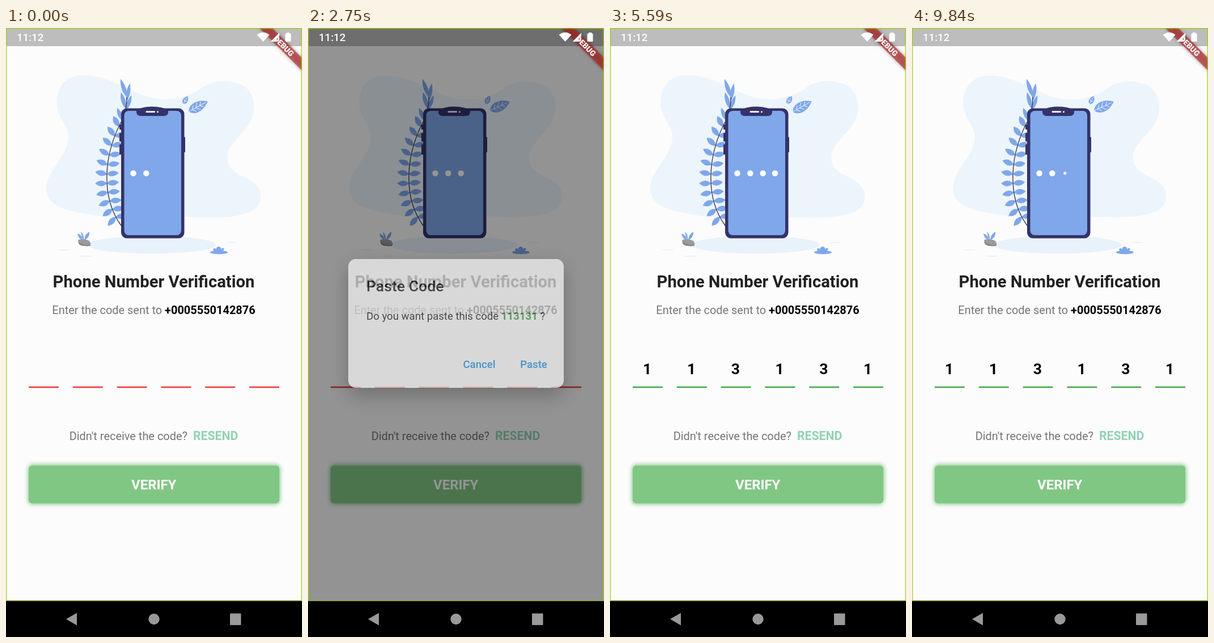
Write an HTML page that moves like this. It is 522x1073 px and loops after 9890 ms.

```html
<!DOCTYPE html>
<html lang="en">
<head>
<meta charset="utf-8">
<title>Phone Number Verification</title>
<style>
  html, body { margin: 0; width: 100%; height: 100%; overflow: hidden; background: #fcfcfc; }
  svg { display: block; width: 522px; height: 1073px; font-family: Roboto, sans-serif; }
  .bold { font-weight: 700; }
  .medium { font-weight: 500; }
  .mid { text-anchor: middle; }
  .button { fill: #81c784; filter: drop-shadow(1px -2px 3px #a5d6a7) drop-shadow(-1px 2px 3px #a5d6a7); }
  .card { fill: #fdfdfd; filter: drop-shadow(0 14px 17px rgba(0, 0, 0, .36)); }
  .ribbon { fill: #b71c1c; fill-opacity: .63; filter: drop-shadow(0 0 3px rgba(0, 0, 0, .5)); }
</style>
</head>
<body>
<svg viewBox="0 0 522 1073">
  <rect width="522" height="1073" fill="#fcfcfc"/>

  <g id="scene">
    <path id="blob" fill="#edf5fc" d="M127 81C175 77 212 109 252 120C288 128 323 121 345 105
      C365 89 391 88 414 96C433 103 442 120 441 140C440 181 393 196 393 230C394 268 453 259 453 299
      C453 324 428 331 398 335C354 340 310 333 261 335C209 338 168 337 127 328C88 321 67 308 67 284
      C67 252 106 228 107 191C107 169 87 160 86 132C85 102 102 83 127 81Z"/>
    <g fill="#e8f2fb">
      <ellipse cx="257" cy="382" rx="113" ry="15.5"/>
      <ellipse cx="102" cy="391" rx="11" ry="1"/>
      <ellipse cx="141" cy="402" rx="11" ry="1"/>
      <ellipse cx="398" cy="378" rx="10" ry="1"/>
    </g>
    <g id="plant" fill="#7fa7ea"></g>
    <path d="M203 348C168 300 170 225 206 160Q213 143 213 122" fill="none" stroke="#2c2b45" stroke-width="1.3"/>

    <g fill="#34326a">
      <rect x="203" y="141.500" width="111.500" height="229" rx="10"/>
      <path d="M236 142Q245 138.500 258 138.500T280 142Z"/>
      <rect x="200" y="170" width="4" height="9" rx="1"/>
      <rect x="200" y="185" width="4" height="15" rx="1"/>
      <rect x="200" y="205" width="4" height="18" rx="1"/>
      <rect x="312" y="192" width="4" height="27" rx="1"/>
    </g>
    <rect x="208.500" y="146" width="100.500" height="219" rx="8" fill="#7fa7ea"/>
    <path d="M230 145H286V148Q286 155 278 155H238Q230 155 230 148Z" fill="#34326a"/>
    <rect x="246.500" y="146.300" width="16.500" height="2.700" rx="1.300" fill="#fff"/>
    <circle cx="267.500" cy="147.700" r="1.500" fill="#fff"/>
    <g id="dots" fill="#fff"></g>

    <g id="bigLeaf">
      <path d="M-19 0C-13 -12 5 -12 19 0C5 12 -13 12 -19 0Z" fill="#7fa7ea"/>
      <path d="M-19 0H15M-12 0L-7 -6M-12 0L-7 6M-5 0L1 -7M-5 0L1 7M3 0L8 -5M3 0L8 5"
        fill="none" stroke="#eaf3fd" stroke-width="1"/>
    </g>
    <g id="smallLeaf">
      <path d="M-8 0C-5 -6 2 -6 8 0C2 6 -5 6 -8 0Z" fill="#7fa7ea"/>
      <path d="M-8 0H5M-3 0L0 -3M-3 0L0 3" fill="none" stroke="#eaf3fd" stroke-width=".8"/>
    </g>

    <path d="M136 373Q134 365 126 362Q127 371 136 374ZM138 373Q139 363 147 359Q148 369 138 374ZM135 373L132 359Q138 364 137 373Z" fill="#7fa7ea"/>
    <path d="M128 373Q138 370 147 375Q152 383 147 384Q136 385 129 381Q126 376 128 373Z" fill="#9b9b9b"/>
    <path d="M128 377Q138 384 149 382Q149 384 146 384Q134 385 129 381Z" fill="#858585"/>
    <ellipse cx="375.500" cy="395.300" rx="15.500" ry="3.200" fill="#7fa7ea"/>
    <path d="M366 393Q364 389 367 388Q370 388 371 390Q370 386 375 385Q380 386 379 390Q381 387 384 388Q386 390 382 393Q375 396 366 393Z" fill="#7fa7ea"/>
  </g>

  <text class="bold mid" x="260.500" y="456.500" font-size="29.240" fill="#212121">Phone Number Verification</text>
  <text class="mid" x="260.500" y="504" font-size="19.940" fill="#757575">Enter the code sent to <tspan class="bold" fill="#000">+0005550142876</tspan></text>
  <g id="fields" class="bold mid" font-size="26.580"></g>
  <text x="111.700" y="725.500" font-size="19.940" fill="#757575">Didn't receive the code?</text>
  <text class="bold" x="330" y="725.500" font-size="21.270" fill="#91d3b3">RESEND</text>
  <rect class="button" x="40" y="771" width="442" height="66.500" rx="6"/>
  <text class="bold mid" x="260.700" y="813" font-size="23.930" fill="#fff">VERIFY</text>

  <rect width="522" height="32" fill-opacity=".25"/>
  <rect id="barrier" width="522" height="1009"/>

  <g id="dialog">
    <rect class="card" x="71" y="407" width="380" height="227" rx="13.300"/>
    <rect id="press" x="355.500" y="568" width="85" height="47.500" rx="2.500" fill="#2196f3"/>
    <text class="medium" x="103" y="464" font-size="26.580" fill="#212121">Paste Code</text>
    <text x="103" y="513.500" font-size="18.610" fill="#212121">Do you want paste this code <tspan class="bold" fill="#43a047">113131</tspan> ?</text>
    <g class="medium mid" font-size="18.610" fill="#2492e8">
      <text x="302" y="598.500">Cancel</text>
      <text x="398" y="598.500">Paste</text>
    </g>
  </g>

  <g transform="translate(522 0) rotate(45)">
    <rect class="ribbon" x="-53.200" y="37.200" width="106.400" height="16"/>
    <text class="mid" y="50" font-size="13.560" font-weight="900" fill="#fff">DEBUG</text>
  </g>
  <g fill="#fff">
    <text class="medium" x="19" y="23.300" font-size="18.610">11:12</text>
    <path d="M442.500 12Q453.500 3.500 464.500 12L453.500 24Z"/>
    <path d="M466.500 24L482 8.500V14L477 19V24Z"/>
    <path d="M477 19L482 14V24H477Z" opacity=".45"/>
    <path d="M495 8H500V9.500H501Q502.500 9.500 502.500 11V22.500Q502.500 24 501 24H494Q492.500 24 492.500 22.500V11Q492.500 9.500 494 9.500H495Z"/>
  </g>
  <rect x=".75" y=".75" width="520.500" height="1008" fill="none" stroke="#9ccc10" stroke-opacity=".8" stroke-width="1.500"/>

  <rect y="1009.500" width="522" height="64"/>
  <g fill="#999">
    <path d="M106 1041.500L125 1030.500V1052.500Z"/>
    <circle cx="261" cy="1041.500" r="9.700"/>
    <rect x="395" y="1031.500" width="19.500" height="20.500" rx="1"/>
  </g>
</svg>

<script>
const LOOP = 9890, CYCLE = 2400;
const OPEN = 2680, CLOSE = 5108, FADE = 150;
const $ = id => document.getElementById(id);
const clamp = v => Math.min(1, Math.max(0, v));
const mix = (a, b, k) => a + (b - a) * k;
const ramp = (t, start, length) => clamp((t - start) / length);

function add(parent, tag, attrs, text = '') {
  const el = document.createElementNS('http://www.w3.org/2000/svg', tag);
  for (const name in attrs) el.setAttribute(name, attrs[name]);
  el.textContent = text;
  return parent.appendChild(el);
}

function cubic(a, b, c, d, u) {
  const v = 1 - u;
  return v * v * v * a + 3 * v * v * u * b + 3 * v * u * u * c + u * u * u * d;
}

const bezier = (x1, y1, x2, y2) => x => {
  let lo = 0, hi = 1;
  for (let i = 0; i < 24; i++) {
    const m = (lo + hi) / 2;
    if (cubic(0, x1, x2, 1, m) < x) lo = m; else hi = m;
  }
  return cubic(0, y1, y2, 1, lo);
};
const ease = bezier(.25, .1, .25, 1);
const easeOut = bezier(0, 0, .58, 1);

function leaf(x, y, degrees, length, width) {
  add($('plant'), 'path', {
    d: `M0 0C${length * .3} ${-width} ${length * .65} ${-width} ${length} 0C${length * .65} ${width} ${length * .3} ${width} 0 0Z`,
    transform: `translate(${x} ${y}) rotate(${degrees})`
  });
}

// Paired leaves along the stem, opening wider towards the ground
const stem = u => [cubic(203, 168, 170, 206, u), cubic(348, 300, 225, 160, u)];
for (let i = 0; i < 11; i++) {
  const u = .1 + i * .083;
  const [x, y] = stem(u), [nx, ny] = stem(u + .01);
  const heading = Math.atan2(ny - y, nx - x) * 180 / Math.PI;
  const spread = mix(118, 48, u);
  for (const side of [-1, 1]) leaf(x, y, heading + side * spread, 21, 6.5);
}
leaf(213, 122, -109, 34, 5);
leaf(213, 128, -80, 31, 4.5);
leaf(211, 142, -106, 30, 5);
leaf(212, 144, -70, 27, 4.5);
leaf(205, 163, -112, 24, 5);

const dots = [224.5, 247.3, 269.7, 291].map(cx => add($('dots'), 'circle', { cx, cy: 256 }));
const lines = [], digits = [];
[...'113131'].forEach((digit, i) => {
  const x = 40 + i * 77.8;
  digits.push(add($('fields'), 'text', { x: x + 25.7, y: 610 }, digit));
  lines.push(add($('fields'), 'rect', { x, y: 631.5, width: 53, height: 2.7 }));
});

function place(id, x, y, angle) {
  $(id).setAttribute('transform', `translate(${x} ${y}) rotate(${angle})`);
}

function drawScene(t) {
  const phase = t % CYCLE;
  const sway = (1 + Math.cos((phase - 1580) / CYCLE * 2 * Math.PI)) / 2;
  const size = mix(.974, 1, sway);
  $('blob').setAttribute('transform', `translate(260 209) scale(${size}) translate(-260 -209)`);
  place('bigLeaf', mix(338.5, 340.5, sway), mix(137.5, 140.5, sway), mix(-24, -45, sway));
  place('smallLeaf', mix(317, 315, sway), mix(127, 126, sway), mix(-63, -43, sway));

  // Dots pop in one by one, then shrink away together
  const grown = (phase - 1600 + CYCLE) % CYCLE;
  const out = ramp(grown, 2140, 140);
  dots.forEach((dot, i) => {
    const k = ramp(grown, 190 + i * 375, 200);
    dot.setAttribute('r', 5.3 * k * (1 - .75 * out));
    dot.setAttribute('opacity', clamp(k * 1.7) * (1 - .85 * out) * (out < 1));
  });
}

function drawForm(t) {
  const shown = ramp(t, OPEN, FADE) - ramp(t, CLOSE, FADE);
  $('barrier').setAttribute('opacity', .54 * ease(shown));
  $('dialog').setAttribute('opacity', easeOut(shown));
  $('press').setAttribute('opacity', .18 * ramp(t, 4970, 140));

  const filled = ramp(t, CLOSE, FADE), valid = ramp(t, 5170, FADE);
  const color = `rgb(${mix(236, 76, valid)},${mix(69, 172, valid)},${mix(64, 80, valid)})`;
  digits.forEach(d => d.setAttribute('opacity', filled));
  lines.forEach(l => l.setAttribute('fill', color));
}

const start = performance.now();
function tick() {
  const t = (performance.now() - start) % LOOP;
  drawScene(t);
  drawForm(t);
  requestAnimationFrame(tick);
}
tick();
</script>
</body>
</html>
```
